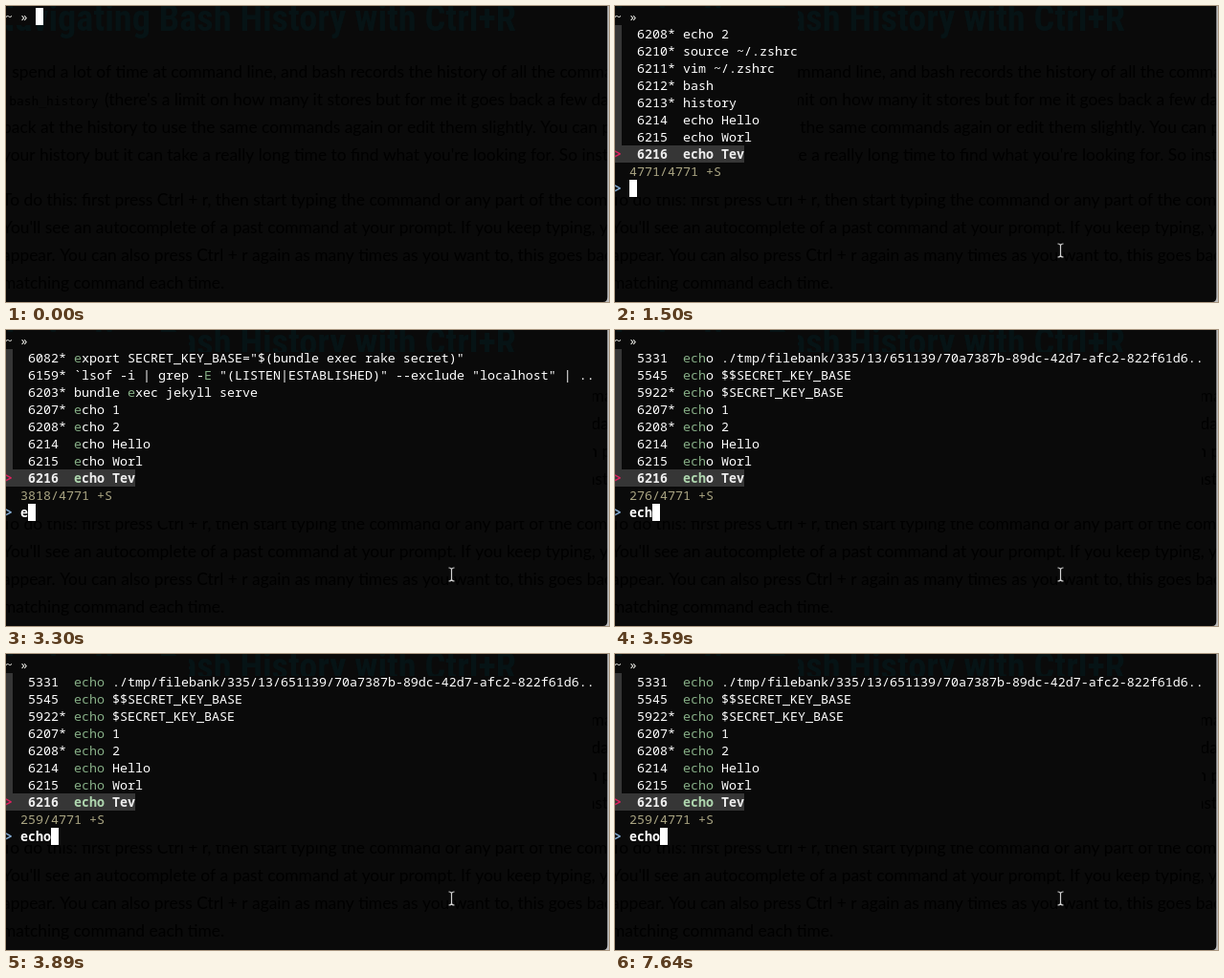
An HTML page with a canvas for the animation above (8 s loop, 630 by 310 pixels).

```html
<!DOCTYPE html>
<html lang="en">
<head>
<meta charset="utf-8">
<title>Shell history search</title>
<style>
  html, body { margin: 0; width: 100%; height: 100%; overflow: hidden; background: #0a0a0a; }
  canvas { display: block; }
</style>
</head>
<body>
<canvas id="stage" width="630" height="310"></canvas>
<script>
const ctx = document.getElementById('stage').getContext('2d');
const LOOP = 8000, CELL = 8, ROW = 18, LEFT = -1, TOP = 2;
const BG = '#0a0a0a', BAR = '#363636';
const MONO = '13.333px "Noto Sans Mono", "DejaVu Sans Mono", monospace';
const BODY = '17.4px Lato, "Open Sans", sans-serif';
const HEAD = '"Liberation Sans Narrow", "Roboto Condensed", "Open Sans Condensed", Roboto, sans-serif';
const TITLE = 'Navigating Bash History with Ctrl+R';

const article = [
  [-3, 75, 'I spend a lot of time at command line, and bash records the history of all the commands'],
  [103, 104, "(there's a limit on how many it stores but for me it goes back a few days)"],
  [-4, 133, 'back at the history to use the same commands again or edit them slightly. You can press'],
  [-4, 162, "your history but it can take a really long time to find what you're looking for. So instead"],
  [-4, 209, 'To do this: first press Ctrl + r, then start typing the command or any part of the command'],
  [-4, 238, "You'll see an autocomplete of a past command at your prompt. If you keep typing, your"],
  [-4, 267, 'appear. You can also press Ctrl + r again as many times as you want to, this goes back'],
  [-4, 296, 'matching command each time.']
];

// Braces mark the matched letters.
const tail = hit => [
  '6214  ' + hit + ' Hello', '6215  ' + hit + ' Worl', '6216  ' + hit + ' Tev'
];
const numbers = hit => ['6207* ' + hit + ' 1', '6208* ' + hit + ' 2', ...tail(hit)];
const echoes = hit => [
  '5331  ' + hit + ' ./tmp/filebank/335/13/651139/70a7387b-89dc-42d7-afc2-822f61d6..',
  '5545  ' + hit + ' $$SECRET_KEY_BASE',
  '5922* ' + hit + ' $SECRET_KEY_BASE',
  ...numbers(hit)
];
const blog = 'appr{e}nti{c}es{h}ip_bl{o}g';

const states = [
  { at: 1500, query: '', info: '4771/4771 +S', rows: [
    '6208* echo 2', '6210* source ~/.zshrc', '6211* vim ~/.zshrc',
    '6212* bash', '6213* history', ...tail('echo')] },
  { at: 3300, query: 'e', info: '3818/4771 +S', rows: [
    '6082* {e}xport SECRET_KEY_BASE="$(bundle exec rake secret)"',
    '6159* `lsof -i | grep -{E} "(LISTEN|ESTABLISHED)" --exclude "localhost" | ..',
    '6203* bundle {e}xec jekyll serve', ...numbers('{e}cho')] },
  { at: 3450, query: 'ec', info: '1782/4771 +S', rows: [
    '5545  {ec}ho $$SECRET_KEY_BASE', '5922* {ec}ho $SECRET_KEY_BASE',
    '6046* git rebase -i {ec}550e6', ...numbers('{ec}ho')] },
  { at: 3590, query: 'ech', info: '276/4771 +S', rows: echoes('{ech}o') },
  { at: 3890, query: 'echo', info: '259/4771 +S', rows: echoes('{echo}') },
  { at: 6440, query: 'echo', info: '259/4771 -S', rows: [
    '6164* cd ' + blog,
    '6190  cp ~/Documents/sort.gif ~/' + blog + '/assets/2017-09-08-so..',
    '6193* cd ~/' + blog, ...numbers('{echo}')] },
  { at: 7640, query: 'echo', info: '259/4771 +S', rows: echoes('{echo}') }
];

function box(x, y, w, h, color) {
  ctx.fillStyle = color;
  ctx.fillRect(x, y, w, h);
}

function words(s, x, y, font, color) {
  ctx.font = font;
  ctx.fillStyle = color;
  ctx.fillText(s, x, y);
}

function term(s, col, row, color, bold) {
  words(s, LEFT + col * CELL, TOP + row * ROW + 14, (bold ? 'bold ' : '500 ') + MONO, color);
}

function block(col, row) {
  box(LEFT + col * CELL, TOP + row * ROW, CELL, ROW, '#fff');
}

// Picks the font size at which the heading spans the given width.
function headFont(width) {
  ctx.font = 'bold 100px ' + HEAD;
  const size = Math.min(44, 100 * width / ctx.measureText(TITLE).width);
  return 'bold ' + size + 'px ' + HEAD;
}
const titleFont = headFont(547);

function drawPage() {
  box(0, 0, 630, 310, BG);
  words(TITLE, -14, 26, titleFont, '#061315');
  for (const [x, y, s] of article) words(s, x, y, BODY, '#000');
  words('~/.bash_history', -20, 104, '12.9px "DejaVu Sans Mono", monospace', '#000');
}

function drawEdge() {
  ctx.fillStyle = '#bdbdbd';
  ctx.beginPath();
  ctx.moveTo(628.3, 0);
  ctx.lineTo(628.3, 305);
  ctx.quadraticCurveTo(628.3, 310, 624, 310);
  ctx.lineTo(630, 310);
  ctx.lineTo(630, 0);
  ctx.fill();
}

function drawItem(item, row, chosen) {
  let col = 3;
  item.split(/[{}]/).forEach((part, i) => {
    const hit = i % 2;
    const color = chosen ? (hit ? '#afd7af' : '#eee') : (hit ? '#87af87' : '#fff');
    term(part, col, row, color, chosen);
    col += part.length;
  });
}

function drawSearch(state) {
  box(0, 2, 191, 198, BG);
  if (state.query) box(15, 23, 598, 177, BG);
  box(0, TOP + ROW, 7, ROW * 8, BAR);
  box(0, TOP + ROW * 8, 135, ROW, BAR);
  state.rows.forEach((item, i) => drawItem(item, i + 1, i === 7));
  term('>', 0, 8, '#e0205f', true);
  term(state.info, 2, 9, '#aaa583');
  term('>', 0, 10, '#87afd7', true);
  term(state.query, 2, 10, '#fff', true);
  block(2 + state.query.length, 10);
}

function drawPointer(x, y) {
  ctx.strokeStyle = '#d4d4d4';
  ctx.lineWidth = 1.2;
  ctx.beginPath();
  for (const s of [-1, 1]) {
    ctx.moveTo(x - 3, y + s * 7);
    ctx.quadraticCurveTo(x, y + s * 7, x, y + s * 5);
    ctx.quadraticCurveTo(x, y + s * 7, x + 3, y + s * 7);
  }
  ctx.moveTo(x, y - 5);
  ctx.lineTo(x, y + 5);
  ctx.stroke();
}

function draw(t) {
  drawPage();
  const state = states.filter(s => s.at <= t).pop();
  if (state) {
    drawSearch(state);
  } else {
    box(LEFT, TOP, CELL * 4, ROW, BG);
    block(4, 0);
  }
  term('~ »', 0, 0, '#f4f4ee');
  drawEdge();
  if (t >= 300) drawPointer(465.5, 256);
  else if (t >= 150) drawPointer(476.5, 262);
}

const start = performance.now();
function tick() {
  draw((performance.now() - start) % LOOP);
  requestAnimationFrame(tick);
}
tick();
</script>
</body>
</html>
```
